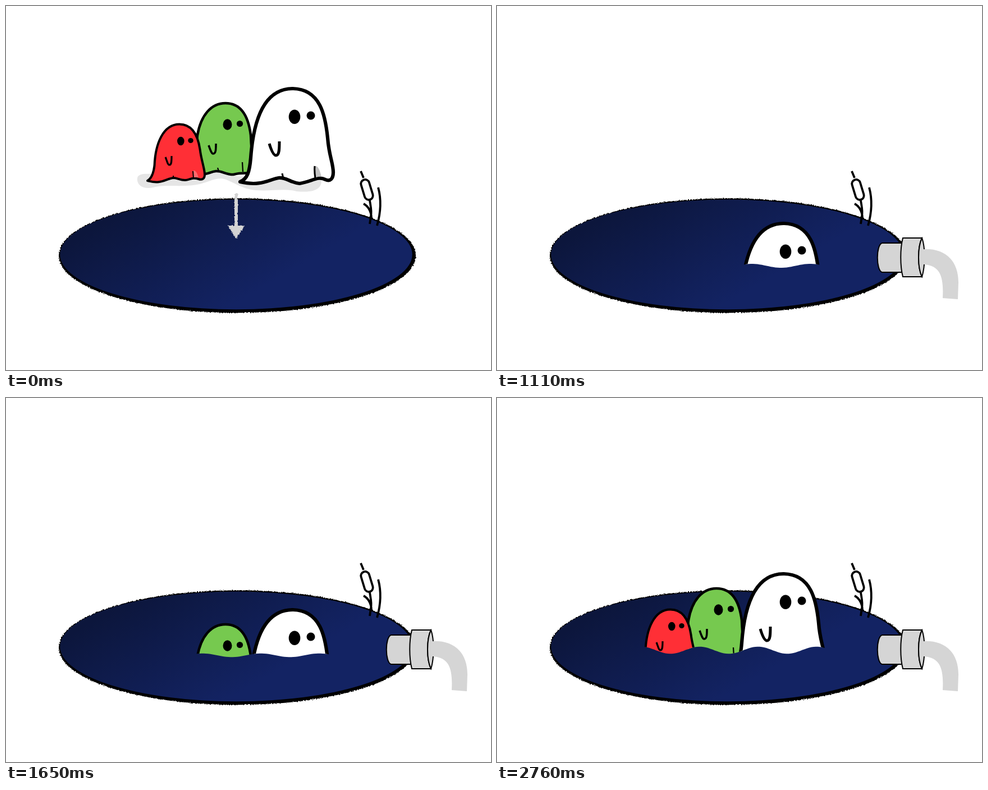
These frames come from a looping animation (864 px wide and 648 px high, 3300 ms). An HTML page:

```html
<!DOCTYPE html>
<html lang="en">
<head>
<meta charset="utf-8">
<title>Ghosts in the pond</title>
<style>
  html, body { margin: 0; width: 100%; height: 100%; overflow: hidden; background: #fff; }
  svg { display: block; width: 864px; height: 648px; }
  .line { fill: none; stroke: #000; }
  .ghost { stroke: #000; stroke-linejoin: round; }
  .ghost .dot { fill: #000; stroke: none; }
  .ghost .shade { stroke: none; }
  .pipe { fill: #d5d5d5; stroke: #000; stroke-width: 2; }
</style>
</head>
<body>
<svg viewBox="0 0 864 648">
  <defs>
    <linearGradient id="water" gradientUnits="userSpaceOnUse" x1="190" y1="376" x2="313" y2="586">
      <stop offset="0" stop-color="#0c163c"/>
      <stop offset="1" stop-color="#132363"/>
    </linearGradient>
    <filter id="chalk" color-interpolation-filters="sRGB">
      <feTurbulence type="fractalNoise" baseFrequency=".4" numOctaves="2" seed="4"/>
      <feDisplacementMap in="SourceGraphic" scale="4" xChannelSelector="R" yChannelSelector="G"/>
    </filter>
    <clipPath id="surface"><path id="wave"/></clipPath>
  </defs>

  <ellipse cx="412" cy="444.3" rx="318" ry="102" filter="url(#chalk)"/>
  <ellipse cx="410" cy="442.4" rx="313.7" ry="97.8" fill="url(#water)"/>

  <g class="line" stroke-width="3.8">
    <path d="M632 294L637 306M648 346C649 354 652 364 650 374L648 388M637 352C645 356 651 366 651 378M663 323C669 345 667 370 661 391"/>
    <rect x="635.5" y="308.5" width="15" height="37" rx="7.5" transform="rotate(-17 643 327)"/>
  </g>

  <g id="arrival">
    <path fill="#e5e5e5" d="M234 306C236 297 255 298 270 301L345 302C365 292 395 293 412 303L440 305L562 311C562 330 540 332 518 330C495 324 475 330 445 328C420 325 412 317 392 309C375 303 362 314 340 318C310 323 285 317 262 323C246 327 232 320 234 306Z"/>
    <path filter="url(#chalk)" fill="#d3d3d3" d="M407 334H413V391H425L410 414L395 391H407Z"/>
  </g>

  <g id="drain">
    <path fill="#d5d5d5" d="M757 433C800 430 822 455 822 492L821 522L794 520C796 482 790 460 757 460Z"/>
    <path class="pipe" d="M721 422H686C675 425 675 471 686 474H721Z"/>
    <path class="pipe" d="M757 413H723C718 432 718 463 723 482H757C749 465 749 430 757 413Z"/>
    <path fill="#d5d5d5" d="M757 413C749 430 749 465 757 482C762 466 762 430 757 413Z"/>
    <path class="line" stroke-width="2" d="M761 433Q760 421 757 413C749 430 749 465 757 482Q760 473 761 460"/>
  </g>

  <g id="scene"><g id="ghosts"></g></g>
</svg>
<script>
const $ = id => document.getElementById(id);

const ghost = (id, fill, width, body, eyes, arm, folds, shade = '', shadeFill = '') => `
  <g id="${id}" class="ghost">
    <path d="${body}" fill="${fill}" stroke-width="${width}"/>
    <path class="shade" d="${shade}" fill="${shadeFill}"/>
    ${eyes.map(([x, y, rx, ry]) => `<ellipse class="dot" cx="${x}" cy="${y}" rx="${rx}" ry="${ry}"/>`).join('')}
    <path class="line" d="${arm}" stroke-width="${width * .8}"/>
    <path class="line" d="${folds}" stroke-width="${width * .5}"/>
  </g>`;

$('ghosts').innerHTML =
  ghost('green', '#76c94f', 4.5,
    'M338 300C339 285 338 255 341 230C347 195 365 173 391 173C420 173 432 198 436 230C437 255 439 280 445 296C434 300 425 295 405 300C390 300 385 293 374 294C362 295 362 301 338 300Z',
    [[394.5, 211, 8, 9.7], [416.5, 209.5, 5.6, 5.6]],
    'M361 248C364 256 366 263 369 263C374 263 374 255 374 245', 'M421 278L422 295M377 288L379 294') +
  ghost('red', '#ff2f36', 4,
    'M252 311C260 307 263 296 264.5 284C266 245 280 210.5 309 210.5C333 210.5 342 232 345.5 255C348 275 354 290 354 300C354 308 349 310 343 308C331 304 327 310 319 310C309 310 306 306 298 306C283 308 277 318 252 311Z',
    [[311.3, 240.5, 6.3, 7.8], [329, 239.5, 4.7, 4.6]],
    'M284 269C287 276 288 283 291 283C295 283 295 276 295 267', 'M333 294L334 307M298 302V307',
    'M334 293C339 292 341 300 343 305L334 305Z', '#ff6a6e') +
  ghost('white', '#fff', 6.2,
    'M417 313C430 308 434 295 436 270C440 215 455 147 511 147C560 148 569 195 573 235C575 265 583 280 583 296C583 308 577 313 569 309C556 302 546 312 523 316C505 314 500 305 486 306C470 308 455 322 417 313Z',
    [[514, 197.3, 10.3, 12.7], [543, 195, 7.5, 7.5]],
    'M469 245C472 255 476 266 481 266C487 266 487 254 487 241', 'M550 285C549 293 550 300 551 307M492 298L494 307',
    'M551 285C557 284 560 297 562 303L551 305Z', '#c4c4c4');

// Each step holds until the next: sink is the drop of the group, level the water line
const steps = [
  { start: 0, sink: 0, show: 'white green red' },
  { start: 570, sink: 0, show: '' },
  { start: 1110, sink: 240, show: 'white', level: 462.5, swell: 3.5, crest: 350 },
  { start: 1650, sink: 230, show: 'white green', level: 458, swell: 3.3, crest: 350 },
  { start: 2220, sink: 207, show: 'white green red', level: 462.3, swell: 3.5, crest: 350 },
  { start: 2760, sink: 166, show: 'white green red', level: 449, swell: 6.3, crest: 361 }
];

function wavePath({ level, swell, crest }) {
  let d = 'M200 0';
  for (let x = 200; x <= 640; x += 4)
    d += `L${x} ${(level - swell * Math.cos((x - crest) / 104 * 2 * Math.PI)).toFixed(2)}`;
  return d + 'V0Z';
}

const toggle = (id, on) => $(id).setAttribute('visibility', on ? 'visible' : 'hidden');
let current;

function draw(now) {
  const time = now % 3300;
  const step = steps.findLast(s => time >= s.start);
  if (step !== current) {
    current = step;
    toggle('arrival', step === steps[0]);
    toggle('drain', step !== steps[0]);
    for (const id of ['white', 'green', 'red']) toggle(id, step.show.includes(id));
    $('ghosts').setAttribute('transform', `translate(0 ${step.sink})`);
    $('scene').setAttribute('clip-path', step.level ? 'url(#surface)' : 'none');
    if (step.level) $('wave').setAttribute('d', wavePath(step));
  }
  requestAnimationFrame(() => draw(performance.now() - origin));
}

const origin = performance.now();
draw(0);
</script>
</body>
</html>
```
